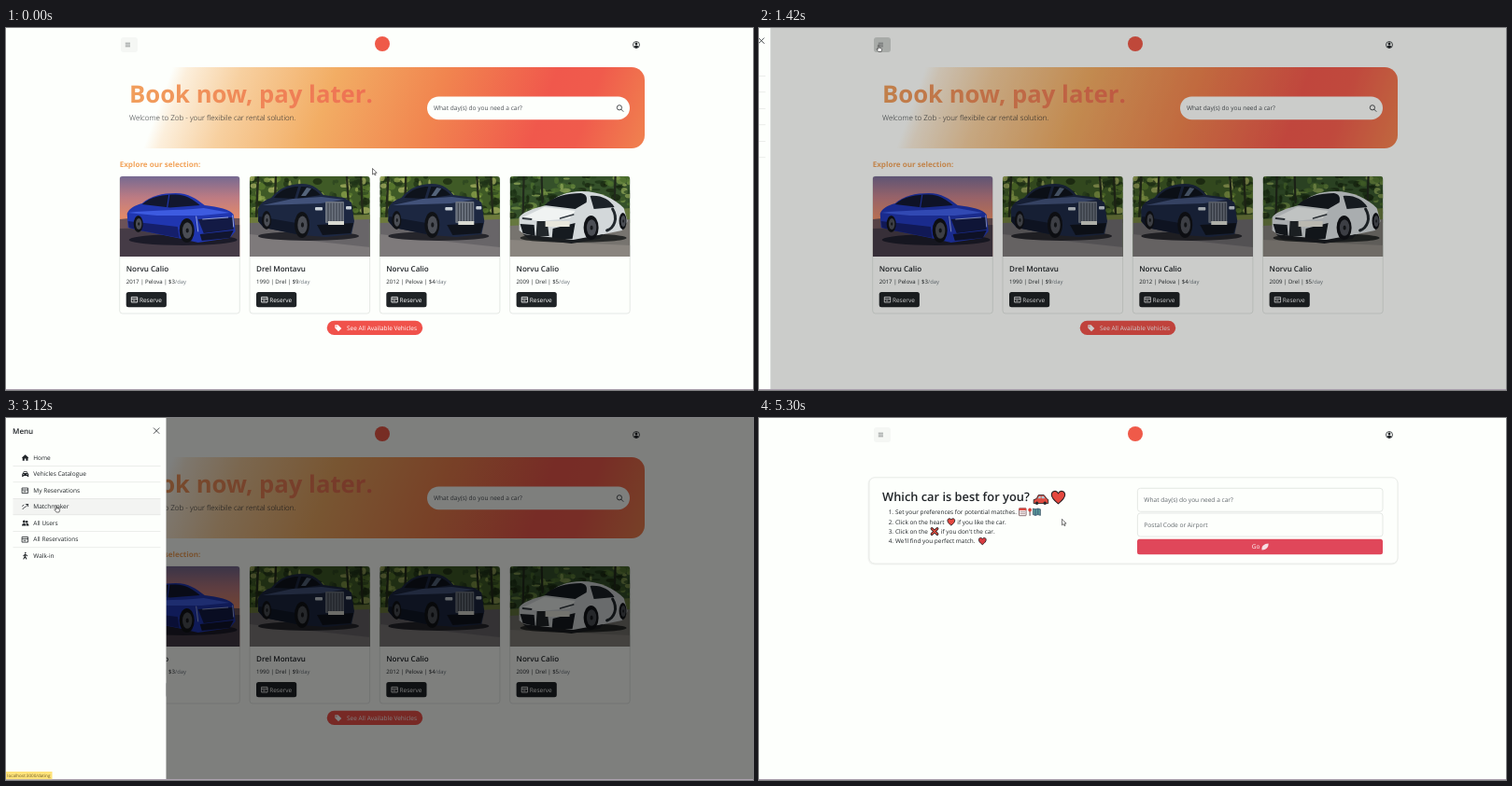
An HTML page for the animation above (5330 ms loop, 800 by 388 pixels).

```html
<!DOCTYPE html>
<html lang="en">
<head>
<meta charset="utf-8">
<title>Car rental</title>
<style>
  html, body { margin: 0; width: 100%; height: 100%; overflow: hidden; background: #fdfffc; }
  svg { display: block; width: 800px; height: 388px; }
  text { font-family: "Open Sans", "Noto Sans", sans-serif; text-rendering: geometricPrecision; white-space: pre; }
  .line { fill: none; stroke: #212529; stroke-width: .8; stroke-linecap: round; stroke-linejoin: round; }
</style>
</head>
<body>
<svg id="stage" viewBox="0 0 800 388" xmlns="http://www.w3.org/2000/svg"></svg>
<script>
const LOOP = 5330, BG = '#fdfffc', INK = '#212529', RED = '#f0524b';

// Markup helpers
const text = (x, y, size, str, fill = INK, weight = 400, extra = '') =>
  `<text x="${x}" y="${y}" font-size="${size}" fill="${fill}" font-weight="${weight}" ${extra}>${str}</text>`;
const rect = (x, y, w, h, fill, r = 0, extra = '') =>
  `<rect x="${x}" y="${y}" width="${w}" height="${h}" rx="${r}" fill="${fill}" ${extra}/>`;
const path = (d, fill, extra = '') => `<path d="${d}" fill="${fill}" ${extra}/>`;
const line = (d, extra = '') => `<path class="line" d="${d}" ${extra}/>`;
const oval = (x, y, rx, ry, fill, extra = '') =>
  `<ellipse cx="${x}" cy="${y}" rx="${rx}" ry="${ry}" fill="${fill}" ${extra}/>`;
const at = (x, y, body, scale = 1) => `<g transform="translate(${x} ${y}) scale(${scale})">${body}</g>`;
const stops = list => list.map(([o, c]) => `<stop offset="${o}" stop-color="${c}"/>`).join('');
const gradient = (id, [x1, y1, x2, y2], list) =>
  `<linearGradient id="${id}" gradientUnits="userSpaceOnUse" x1="${x1}" y1="${y1}" x2="${x2}" y2="${y2}">${stops(list)}</linearGradient>`;

// Photos, each 129 x 86
const wheel = (x, y, rx, ry) => oval(x, y, rx, ry, '#101216') + oval(x + .5, y, rx * .65, ry * .68, '#4b4e55') + oval(x + .5, y, rx * .2, ry * .2, '#17191d');

function foliage(seed, colors) {
  const rnd = () => (seed = seed * 16807 % 2147483647) / 2147483647;
  let out = '';
  for (let i = 0; i < 150; i++) {
    out += oval((rnd() * 129).toFixed(1), (rnd() * 42).toFixed(1), (1 + rnd() * 5).toFixed(1), (1 + rnd() * 3).toFixed(1),
      colors[Math.floor(rnd() * colors.length)], 'opacity=".7"');
  }
  return out;
}

const sunset =
  rect(0, 0, 129, 86, 'url(#sky)') +
  path('M0 46 30 43 129 45V86H0Z', '#6b5258') + path('M0 56 129 52V86H0Z', '#453b46') +
  oval(68, 68, 58, 6, '#1c1b28') +
  path('M8 40C10 34 17 31 24 29 33 21 46 18 60 18 74 18 82 24 91 31 106 33 118 35 122 41L124 59 118 66 84 71 62 66 22 58 9 55Z', '#2036b0') +
  path('M9 48 62 54 64 66 22 58 10 55Z', '#151f6b') +
  path('M24 30C34 21 47 19.5 60 19.5 71 19.5 79 25 86 31L54 33.5Z', '#12172f') + line('M53 20 51 33', 'style="stroke:#2036b0;stroke-width:1.2"') +
  path('M9 39C30 36 60 37 90 34L118 39 88 42 40 42Z', '#3d5be0') +
  path('M84 46 121 44 122 57 90 61Z', '#131a45') + path('M86 62 122 58 118 66 88 69Z', '#11152f') +
  line('M82 43 84 59M121 42 122 54M89 46 116 44', 'style="stroke:#b9c4ee"') +
  wheel(20, 51, 5, 9) + wheel(72, 58, 8, 13);

const limousine =
  rect(0, 0, 129, 86, '#3f5a26') + foliage(17, ['#1d3016', '#5f7f2f', '#93a94f', '#2b4320', '#b0b866', '#17260f']) +
  line('M9 0 7 44M28 0 27 26M104 0 106 32M119 0 121 42', 'style="stroke:#232a19;stroke-width:2.4"') +
  path('M0 44 129 41V50H0Z', '#6d7a3c') + path('M0 50 129 46V86H0Z', '#686568') + path('M0 62 129 76V86H0Z', '#7e7a7b') +
  oval(63, 64, 54, 5, '#25252b') +
  path('M9 34C12 28 17 25 23 23 31 13 42 8 56 8 68 8 73 13 79 20L101 23 109 28 112 48 109 62 82 65 56 63 15 55 9 48Z', '#1c2741') +
  path('M26 23C34 13 44 11 52 11L48 24ZM51 24 55 11C66 10.5 71 15 76 20Z', '#0e131c') + path('M55 21 61 12 66 13 60 21Z', '#54647a') +
  path('M46 24 77 22 101 25 76 29 14 31Z', '#42527a') +
  path('M10 43 50 50 50 62 15 55 9 48Z', '#111829') +
  rect(81, 27, 20, 23, '#6d7480', 1) + line('M84 29V48M87 29V48M90 29V48M93 29V48M96 29V48M99 29V48', 'style="stroke:#272c36"') +
  rect(70, 33, 8, 3.5, '#c6ced6', 1) + rect(103, 32, 6, 3.5, '#c6ced6', 1) +
  path('M72 52 111 50 108 61 78 63Z', '#0f131c') + rect(84, 48, 17, 4, '#d9dad2') +
  wheel(18, 47, 5, 10) + wheel(56, 52, 8, 14);

const sports =
  rect(0, 0, 129, 86, '#35512a') + foliage(91, ['#1a2f14', '#4f732f', '#789646', '#2c4822', '#94ab5a', '#14220d']) +
  line('M15 0 14 42M34 0 35 28M113 0 112 30', 'style="stroke:#20281b;stroke-width:2.2"') +
  path('M0 46 129 34V50L0 55Z', '#66783f') + path('M0 53 129 46V86H0Z', '#77746f') + path('M0 68 129 74V86H0Z', '#8a857f') +
  oval(68, 66, 57, 5, '#262827') +
  path('M10 44C14 38 26 34 39 31 48 21 62 16 77 16 97 16 112 24 122 34L126 48 120 58 96 63 68 69 20 65 10 58Z', '#d3d8da') +
  path('M37 31C47 21 62 18 76 18 82 19 83 22 82 28L70 35Z', '#151a20') +
  path('M86 21C98 20 107 25 112 33L90 35Z', '#1c2228') + line('M110 35C116 45 112 55 104 58', 'style="stroke:#22282d;stroke-width:3"') +
  path('M12 45 37 33 70 37 64 45 33 48Z', '#f0f3f2') +
  path('M11 51 26 52 27 64 14 61ZM46 56 70 50 67 67 45 67Z', '#161b20') +
  path('M29 48H40L42 64H28Z', '#22272b') + rect(38, 48, 26, 6, '#e8e7dd') +
  line('M14 45 23 46M54 45 68 41', 'style="stroke:#343b41;stroke-width:1.8"') +
  path('M14 62 68 68 100 62 96 67 66 72 20 67Z', '#1a1d20') +
  wheel(87, 55, 8, 13) + wheel(121, 48, 4, 9);

// Icons, roughly 8 x 8 with the origin at the top left
const calendar = color => line('M.5 1.2H6.5V6.8H.5ZM.5 3.2H6.5M2 5H4', `style="stroke:${color}"`);
const people = oval(2.3, 2.2, 1.4, 1.5, INK) + oval(5.2, 2.4, 1.2, 1.3, INK) + path('M0 6.6C0 3.3 4.6 3.3 4.6 6.6ZM5 6.6C5 5.2 4.6 4.6 4.3 4.2 6 3.5 7.5 4.6 7.5 6.6Z', INK);
const sedan = path('M1 2.9 2 .9H5.4L6.4 2.9 7.2 3.8V6.7H5.8V5.7H1.6V6.7H.2V3.8Z', INK) + path('M1.9 2.8 2.4 1.7H5L5.5 2.8Z', BG) + oval(1.8, 4.3, .5, .5, BG) + oval(5.6, 4.3, .5, .5, BG);
const house = path('M0 3.8 3.6.4 7.2 3.8 6.5 4.4V7H4.4V4.8H2.8V7H.7V4.4Z', INK);
const route = line('M1 6.3C2 3.5 4.5 5.5 5.8 1.4M4.3 1.2H6.6M6.6 1.2V3.4M.5 3 2 2');
const walker = oval(3.8, .8, .8, .8, INK) + line('M3.6 2.2 3.4 4.4 4.8 7.2M3.4 4.4 1.9 7.2M1.8 3.8 3.6 2.3 5.6 3.9', 'style="stroke-width:1.05"');
const heart = (fill, w = .9) => path('M4.5 8.2C2.2 6.4.6 4.9.6 3 .6.7 3.4.1 4.5 2.1 5.6.1 8.4.7 8.4 3 8.4 4.9 6.8 6.4 4.5 8.2Z', fill, `stroke="#292326" stroke-width="${w}"`);
const miniCar = path('M1 10V6L4 5 6 1H12L15 5 16.5 6V10Z', '#de4b40', 'stroke="#2b2527" stroke-width=".9"') +
  path('M5.4 4.7 6.8 2.1H8.5V4.7ZM9.4 4.7V2.1H11.5L13.2 4.7Z', '#a9cad5') + oval(4.4, 9.6, 1.7, 1.7, '#2a282b') + oval(13, 9.6, 1.7, 1.7, '#2a282b');
const dates = rect(.5, .7, 7.6, 8, '#f5efee', .6, 'stroke="#604044" stroke-width=".7"') + rect(.5, .7, 7.6, 2.3, '#db463d') + line('M2 4.6H6.6M2 6.4H6.6', 'style="stroke:#a78c90"');
const pin = rect(1.6, 3, 1, 5.8, '#5f4445') + oval(2.1, 2.5, 1.8, 2, '#d83d37');
const map = path('M.4 1 3 1.8 5.8 1 8.4 1.8V8.4L5.8 7.6 3 8.4.4 7.6Z', '#5b9a96', 'stroke="#344a61" stroke-width=".7"') + line('M3 2V8M5.8 1.4V7.4', 'style="stroke:#314f7c"');
const cross = line('M1.6 1.6 7.4 7.4M7.4 1.6 1.6 7.4', 'style="stroke:#35272a;stroke-width:3"') + line('M1.7 1.7 7.3 7.3M7.3 1.7 1.7 7.3', 'style="stroke:#d8493c;stroke-width:1.5"');

const header =
  rect(123, 10, 18, 16, '#f5f7f4', 3, 'id="toggle"') +
  line('M128.2 16.2H132.6M128.2 18H132.6M128.2 19.8H132.6', 'style="stroke:#555a5c;stroke-width:.6"') +
  oval(403, 17, 8, 8, '#ef5a49') +
  oval(675, 18, 3.5, 3.5, 'none', `stroke="${INK}" stroke-width=".8"`) + oval(675, 17, 1.4, 1.4, INK) + path('M672.4 20.3C673 18.3 677 18.3 677.6 20.3L675 21.7Z', INK);

const cars = [
  ['sunset', 'Norvu Calio', '2017 | Pelova | $3'],
  ['limousine', 'Drel Montavu', '1990 | Drel | $9'],
  ['limousine', 'Norvu Calio', '2012 | Pelova | $4'],
  ['sports', 'Norvu Calio', '2009 | Drel | $5']
];
const card = ([photo, name, info], i) => at(121.7 + i * 139.3, 159,
  rect(0, 0, 128.6, 147, BG, 3, 'stroke="#dfe2df" stroke-width=".8"') +
  `<use href="#${photo}" clip-path="url(#photoClip)"/>` +
  text(7, 101.8, 8.07, name, INK, 600) +
  text(7, 114.6, 6.07, info + '<tspan font-size="5.8" fill="#6c757d">/day</tspan>') +
  rect(7, 124, 43.2, 16.3, '#1f2326', 2.5) +
  at(12.5, 128.2, calendar('#fff')) + text(21.2, 134.6, 6.5, 'Reserve', '#fff'));

const home =
  rect(118, 42, 566, 87, 'url(#hero)', 14) +
  text(132, 80.4, 25.7, 'Book now, pay later.', 'url(#title)', 700) +
  text(132, 98.8, 7.95, 'Welcome to Zob - your flexibile car rental solution.', INK, 300) +
  rect(451, 73.4, 217, 24.8, BG, 12.4) +
  text(458, 88.3, 6.57, 'What day(s) do you need a car?', '#4d5257') +
  oval(656.9, 85.3, 2.6, 2.6, 'none', `stroke="${INK}" stroke-width=".8"`) + line('M658.9 87.3 661 89.4') +
  text(121.7, 149.3, 8.06, 'Explore our selection:', '#f2a45c', 700) +
  cars.map(card).join('') +
  rect(343.7, 313.7, 102.5, 15.4, RED, 7.7) +
  path('M352.3 318.3H355.6L359.3 322 356 325.2 352.3 321.6Z', '#fff') + oval(353.9, 319.9, .6, .6, RED) +
  text(365, 323.8, 6.5, 'See All Available Vehicles', '#fff');

const steps = [
  'Set your preferences for potential matches.', 'Click on the heart', 'Click on the', 'We\'ll find you perfect match.'
];
const field = (y, label) => rect(405.4, y, 262.6, 25, BG, 3, 'stroke="#dfe2df" stroke-width=".8"') + text(412.3, y + 15, 6.62, label, '#63696e');
const matcher =
  rect(116.5, 63.5, 568, 94, '#f2f4f1', 7) +
  rect(118, 63.8, 566, 92.2, BG, 6, 'stroke="#e5e8e4" stroke-width=".8"') +
  text(132, 89.4, 12.85, 'Which car is best for you?', INK, 600) +
  at(293.2, 81.6, miniCar) + at(312.2, 76.8, heart('#e5483f', .6), 1.84) +
  steps.map((s, i) => text(138.7, 103.2 + i * 10.35, 6.45, i + 1 + '.') + text(146, 103.2 + i * 10.35, 6.45, s)).join('') +
  at(278, 96, dates) + at(288, 96, pin) + at(293, 96, map) +
  at(201.3, 106.9, heart('#e5483f')) + text(212.3, 113.55, 6.45, 'if you like the car.') +
  at(183.5, 117, cross) + text(194.8, 123.9, 6.45, 'if you don\'t the car.') +
  at(234.8, 127.5, heart('#d93c42')) +
  field(75.3, 'What day(s) do you need a car?') + field(102, 'Postal Code or Airport') +
  rect(405, 129.8, 263, 16.4, '#e0475a', 2.5) +
  text(527.8, 140.4, 6.5, 'Go', '#fff') + path('M538.5 141.5C538 137 541 135 545.6 134.6 545.8 139 543 141.6 538.5 141.5Z', '#f6dfe3');

const links = [
  [house, 'Home'], [sedan, 'Vehicles Catalogue'], [calendar(INK), 'My Reservations'], [route, 'Matchmaker'],
  [people, 'All Users'], [calendar(INK), 'All Reservations'], [walker, 'Walk-in']
];
const ROW = 17.5, TOP = 33.8;
const menu =
  rect(0, 0, 171.3, 387, BG) + rect(171, 0, .6, 387, '#c8cac8') +
  text(7, 16.8, 8, 'Menu', INK, 600) + line('M158.3 10.8 164 16.5M164 10.8 158.3 16.5') +
  rect(7.5, 0, 158, ROW, '#f3f4f2', 0, 'id="hover"') +
  links.map(([icon, label], i) => {
    const y = TOP + i * ROW;
    return at(17, y + 5, icon) + text(29.3, y + 11.1, 6.5, label) +
      (i < 6 ? rect(7.5, y + ROW - .3, 158, .6, '#dfe1df') : '');
  }).join('');

const pointers = {
  arrow: path('M0 0V6.6L1.6 5.2 2.6 7.4 3.6 6.9 2.6 4.8H4.6Z', '#fff', 'stroke="#222" stroke-width=".6"'),
  beam: line('M-1.2-2.6H1.2M0-2.6V2.6M-1.2 2.6H1.2', 'style="stroke-width:.7"'),
  hand: path('M-.6.2C-.6-.6.6-.6.6.2V2.8L3.1 3.3C3.7 3.5 3.8 4 3.6 4.7L2.9 7H0L-2.1 4.4C-2.2 3.6-1.4 3.6-.6 4.4Z', '#fff', 'stroke="#222" stroke-width=".6"')
};

const stage = document.getElementById('stage');
stage.innerHTML = '<defs>' +
  gradient('hero', [163, 85, 637, 257], [[0, BG], [.03, '#fcefdc'], [.14, '#f7d0a0'], [.33, '#f2ad64'], [.55, '#f1854f'], [.77, '#f0584c'], [.86, '#f05b4c'], [1, '#f0824f']]) +
  gradient('title', [132, 0, 393, 0], [[0, '#f19f5d'], [1, '#ee6f52']]) +
  gradient('sky', [0, 0, 0, 50], [[0, '#766a91'], [.45, '#bc7b83'], [1, '#ed8e62']]) +
  '<clipPath id="photoClip"><path d="M0 86V3Q0 0 3 0H125.6Q128.6 0 128.6 3V86Z"/></clipPath>' +
  Object.entries({ sunset, limousine, sports }).map(([id, body]) => `<g id="${id}">${body}</g>`).join('') +
  '</defs>' + rect(0, 0, 800, 388, BG) +
  header + `<g id="home">${home}</g><g id="matcher">${matcher}</g>` +
  rect(0, 0, 800, 388, '#000', 0, 'id="shade"') + `<g id="menu">${menu}</g>` +
  rect(0, 387, 800, 1, '#aaa0ad') +
  `<g id="status">${rect(0, 379, 49.5, 8.2, '#ffe37a')}${text(1.3, 385, 4.6, 'localhost:3000/dating', '#6b5a2a')}</g>` +
  `<g id="pointer">${Object.entries(pointers).map(([id, body]) => `<g id="${id}">${body}</g>`).join('')}</g>`;

// Timeline in ms
const OPEN = 1371, NAVIGATE = 3480;
const track = [
  [0, 392.5, 150.5], [120, 388, 149], [550, 190, 66], [880, 146, 52], [1100, 131, 24], [1300, 128, 18.5],
  [1560, 128, 18.5], [2000, 123.5, 19.5], [2300, 123.5, 19.5], [2650, 92, 43], [2950, 60, 83], [3120, 54, 94],
  [3640, 53.5, 93.3], [3900, 55, 95], [4400, 145, 112], [4900, 250, 116], [5230, 324.5, 108.3], [LOOP, 324.5, 108.3]
];
const shapes = [[0, 'arrow'], [640, 'beam'], [1010, 'arrow'], [1110, 'hand'], [1600, 'arrow'], [2500, 'hand'], [NAVIGATE, 'arrow'], [4420, 'beam'], [5010, 'arrow']];

const clamp = v => Math.min(1, Math.max(0, v));
const smooth = v => v * v * (3 - 2 * v);
const el = id => document.getElementById(id);
const show = (id, on) => { el(id).style.display = on ? '' : 'none'; };

function pointerAt(t) {
  const i = track.findIndex(k => k[0] > t);
  const [t0, x0, y0] = track[i - 1], [t1, x1, y1] = track[i];
  const p = smooth((t - t0) / (t1 - t0));
  return [x0 + (x1 - x0) * p, y0 + (y1 - y0) * p];
}

function render(t) {
  const [x, y] = pointerAt(t);
  const away = t >= NAVIGATE, opened = t >= OPEN && !away;
  show('home', !away);
  show('matcher', away);
  show('shade', opened);
  show('menu', opened);
  show('status', t >= 2960 && t < 3950);
  el('shade').setAttribute('opacity', .5 * clamp((t - OPEN) / 125));
  el('menu').setAttribute('transform', `translate(${-171.3 * (1 - smooth(clamp((t - OPEN) / 300)))} 0)`);
  el('toggle').setAttribute('fill', t > 1110 && t < 1600 ? '#d2d5d2' : '#f5f7f4');

  const row = Math.floor((y - TOP) / ROW);
  show('hover', t > 2300 && row >= 0);
  el('hover').setAttribute('y', TOP + row * ROW);

  const shape = shapes.filter(s => s[0] <= t).pop()[1];
  Object.keys(pointers).forEach(id => show(id, id === shape));
  el('pointer').setAttribute('transform', `translate(${x} ${y})`);
}

const start = performance.now();
function tick() {
  render((performance.now() - start) % LOOP);
  requestAnimationFrame(tick);
}
tick();
</script>
</body>
</html>
```
